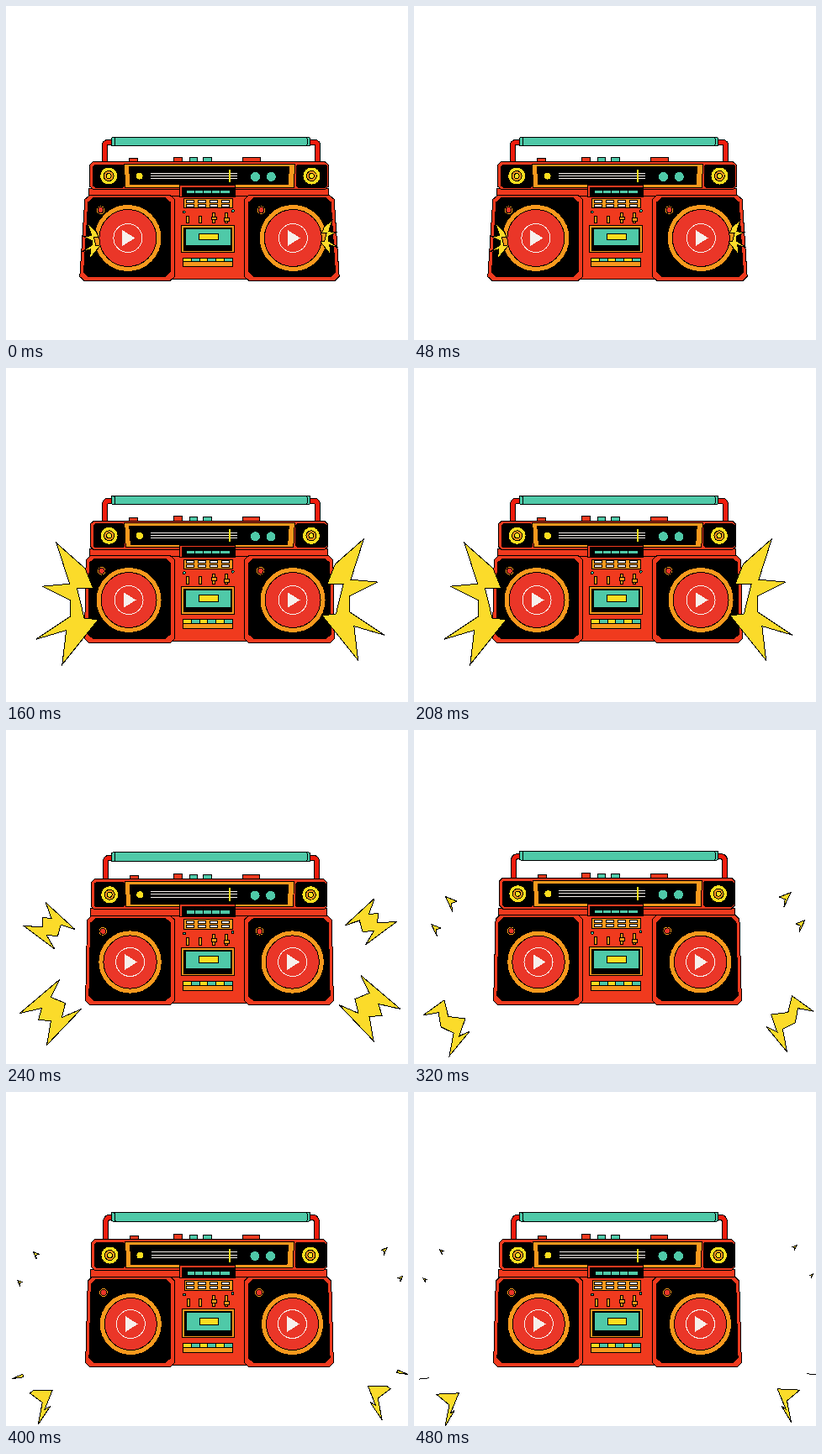
An HTML page that plays this animation: 478 px wide and 398 px high, repeating every 0.56 s.

```html
<!DOCTYPE html>
<html lang="en">
<head>
<meta charset="utf-8">
<title>Boombox</title>
<style>
html, body { margin: 0; width: 100%; height: 100%; overflow: hidden; background: #fff; }
svg { display: block; width: 478px; height: 398px; }
</style>
</head>
<body>
<svg id="stage" viewBox="-.5 -.5 478 398" stroke="#000" shape-rendering="crispEdges"></svg>
<script>
const RED = '#f03a1e', CONE = '#ea3628', ARM = '#f01c0c', ORANGE = '#f9991d',
      YELLOW = '#fcde1f', BOLT = '#fbdb2a', TEAL = '#4fc9a8', BLACK = '#000', WHITE = '#f6f0ec';
const STEP = 80, STEPS = 7, BREAKUP = 3;
const SQUASH = [.83, 1, .55, .18, .07, 0, 0];
const stage = document.getElementById('stage');

const clamp = v => Math.min(1, Math.max(0, v));
const lerp = (a, b, t) => a + (b - a) * t;
const repeat = (n, draw) => Array.from({ length: n }, (_, i) => draw(i)).join('');
const parse = text => text.split(' ').map(pair => pair.split(',').map(Number));

const polygon = (points, fill) => `<polygon points="${points}" fill="${fill}"/>`;
const circle = (x, y, r, fill, stroke = BLACK) =>
  `<circle cx="${x}" cy="${y}" r="${r}" fill="${fill}" stroke="${stroke}"/>`;
const line = (d, stroke, width) =>
  `<path d="${d}" fill="none" stroke="${stroke}" stroke-width="${width}"/>`;

// Corners of a rectangle with cut corners
const bevel = (x1, y1, x2, y2, c) => [
  [x1 + c, y1], [x2 - c, y1], [x2, y1 + c], [x2, y2 - c],
  [x2 - c, y2], [x1 + c, y2], [x1, y2 - c], [x1, y1 + c]];

function boombox(squash) {
  const flare = clamp((squash - .5) / .3);
  // The top sinks most, the base stays put
  const warp = (x, y) => [
    241 + (x - 241) * (1 + .014 * squash),
    y + 12 * squash * (Math.max(0, 326 - y) / 151) ** 1.6
  ];
  const shape = (points, fill) => polygon(points.map(p => warp(...p)), fill);
  const box = (x1, y1, x2, y2, fill, inset = 0) =>
    shape([[x1, y1], [x2, y1], [x2 - inset, y2], [x1 + inset, y2]], fill);
  const dot = (x, y, r, fill) => circle(...warp(x, y), r, fill);
  const stroke = (x1, y1, x2, y2, color, width) =>
    line(`M${warp(x1, y1)}L${warp(x2, y2)}`, color, width);

  const arm = (foot, dir) => {
    const d = `M${warp(foot, 176)}L${warp(foot, 155)}Q${warp(foot, 149)} ${warp(foot + 5 * dir, 149)}h${5 * dir}`;
    return line(d, BLACK, 7) + line(d, ARM, 5);
  };
  const bar = (x, w) =>
    `<rect x="${x}" y="${warp(0, 142.5)[1]}" width="${w}" height="${11 - squash}" rx="1.5" fill="${TEAL}"/>`;
  const handle = () => arm(118, 1) + arm(369, -1) + bar(125, 236) + bar(128.5, 229);

  const tweeter = x =>
    shape(bevel(x - 18, 179, x + 18, 209, 2), BLACK)
    + dot(x, 194, 10.5, YELLOW) + dot(x, 194, 6, ORANGE) + dot(x, 194, 3, YELLOW);

  const topDeck = () =>
    box(147, 171, 157, 176, RED) + box(199, 169, 209, 176, RED) + box(281, 170, 301, 176, RED)
    + box(218, 170, 227, 176, TEAL) + box(234, 170, 244, 176, TEAL)
    + box(100, 211, 381, 221, RED)
    + shape(bevel(101, 175, 381, 212, 4), RED)
    + tweeter(123) + tweeter(361.5)
    + box(141, 178, 342, 209, ORANGE, 1.5) + box(147, 182, 335, 205, BLACK, 1.5)
    + dot(159, 194, 4.5, YELLOW)
    + repeat(3, i => stroke(172, 190.3 + i * 3.4, 274, 190.3 + i * 3.4, WHITE, 1))
    + stroke(265, 186, 265, 202, YELLOW, 2)
    + dot(295.5, 195, 6, TEAL) + dot(314, 195, 6, TEAL);

  const slider = (x, top, knob) =>
    box(x, top, x + 3, 255, ORANGE) + (knob ? box(x - 1.5, knob, x + 5, knob + 4, ORANGE) : '');

  const centre = () =>
    box(194, 220, 289, 325, RED)
    + box(206, 206, 272, 221, RED) + box(209, 209, 270.5, 220.5, BLACK)
    + box(214.5, 213, 266, 217.5, TEAL)
    + repeat(4, i => stroke(224 + i * 10, 213, 224 + i * 10, 217.5, BLACK, 1))
    + box(211.5, 224, 268.5, 236, ORANGE)
    + repeat(8, i => {
      const x = 214 + (i % 4) * 14, y = 226 + (i >> 2) * 5;
      return box(x, y, x + 9, y + 3, WHITE);
    })
    + dot(211.5, 241, 1.5, TEAL) + dot(269, 239.5, 1.5, TEAL)
    + slider(214.5, 246) + slider(229, 246) + slider(245, 242, 247) + slider(260, 242, 249)
    + box(208.5, 258, 271, 292, ORANGE) + box(211.5, 261, 268, 289.5, BLACK)
    + box(213.5, 262, 266.5, 284, TEAL) + box(229.5, 268.5, 251.5, 276.5, YELLOW)
    + box(210, 304, 269, 310, ORANGE)
    + repeat(6, i => box(210 + i * 9.83, 299, 219.83 + i * 9.83, 304, i % 2 ? TEAL : YELLOW));

  // Drawn as the left speaker; the right one is its reflection
  const speaker = (mirrored, coneX, knobX) => {
    const place = ([x, y]) => {
      const reach = (200 - x) / 103, low = (y - 219) / 108;
      const left = x - reach * lerp(4 * squash, 3 + 7 * flare, low);
      return [mirrored ? 483 - left : left, warp(x, y)[1]];
    };
    const r = 37 + 3.6 * squash, knobY = warp(0, 238.5)[1];
    return polygon(bevel(97, 219.5, 200, 327, 5).map(place), RED)
      + polygon(bevel(101, 223, 195, 322, 5.5).map(place), BLACK)
      + circle(knobX, knobY, 5.3, ORANGE) + circle(knobX, knobY, 3.4, CONE)
      + circle(coneX, 276, r, ORANGE) + circle(coneX, 276, r - 6, CONE)
      + circle(coneX, 276, 17, 'none', WHITE)
      + `<path d="M${coneX - 6.5} 266.5l15 9.5l-15 9.5z" fill="${WHITE}" stroke="none"/>`;
  };

  return handle() + topDeck() + centre()
    + speaker(false, 147.8 - 4.1 * squash, 115.5 - 4.1 * squash)
    + speaker(true, 340 + squash, 300.5 + 3 * squash);
}

const burst = parse('58,206 93,237 103,262 83,261 92,298 109,300 65,355 70,313 33,324 75,296 75,276 41,259 74,256');
const bolt = parse('16,337 63,297 53,318 70,325 66,342 89,332 48,375 53,346 38,345 42,331');
const frayed = parse('7,341 20,335 33,354 55,354 46,377 53,373 38,395 43,369 28,358 21,339');
const chip = parse('0,0 10,4 5,6 6,13');

const scaled = (points, x, y, k) => points.map(([px, py]) => [x + px * k, y + py * k]);

function upperBolt() {
  const cos = Math.cos(1.45) * .77, sin = Math.sin(1.45) * .77;
  return bolt.map(([x, y]) => [
    51 + (x - 54) * cos - (y - 336) * sin,
    234 + (x - 54) * sin + (y - 336) * cos
  ]);
}

// Sparks left of the boombox: a growing burst, then two bolts that fly apart
function sparks(step) {
  if (step < BREAKUP) {
    const grow = 1 - .72 * .2 ** step;
    return [burst.map(([x, y]) => [lerp(112, x, grow), lerp(280, y, grow)])];
  }
  const t = 1.15 * (1 - (1 - (step - BREAKUP) / 3) ** 2);
  const lower = bolt.map(([x, y], i) => [lerp(x, frayed[i][0], t), lerp(y, frayed[i][1], t)]);
  const lowerParts = t < 1 ? [lower] : [[lower[0], lower[1], lower[9]], lower.slice(2, 9)];
  const size = 1.8 * (1.4 - t);
  const upperParts = t === 0 ? [upperBolt()] : [
    scaled(chip, 45.7 - 13.6 * t, 211.5 - 21 * t, size),
    scaled(chip, 32 - 18.5 * t, 243 - 18.7 * t, size * .8)];
  return [...upperParts, ...lowerParts];
}

const reflect = points => points.map(([x, y]) => [484.5 - x, y - 5]);

const drawings = SQUASH.map((squash, step) =>
  boombox(squash)
  + sparks(step).flatMap(s => [s, reflect(s)]).map(s => polygon(s, BOLT)).join(''));

let start, shown;
function show(step) {
  if (step !== shown) stage.innerHTML = drawings[shown = step];
}
function render(now) {
  start ??= now;
  show(Math.floor((now - start) / STEP) % STEPS);
  requestAnimationFrame(render);
}
show(0);
requestAnimationFrame(render);
</script>
</body>
</html>
```
